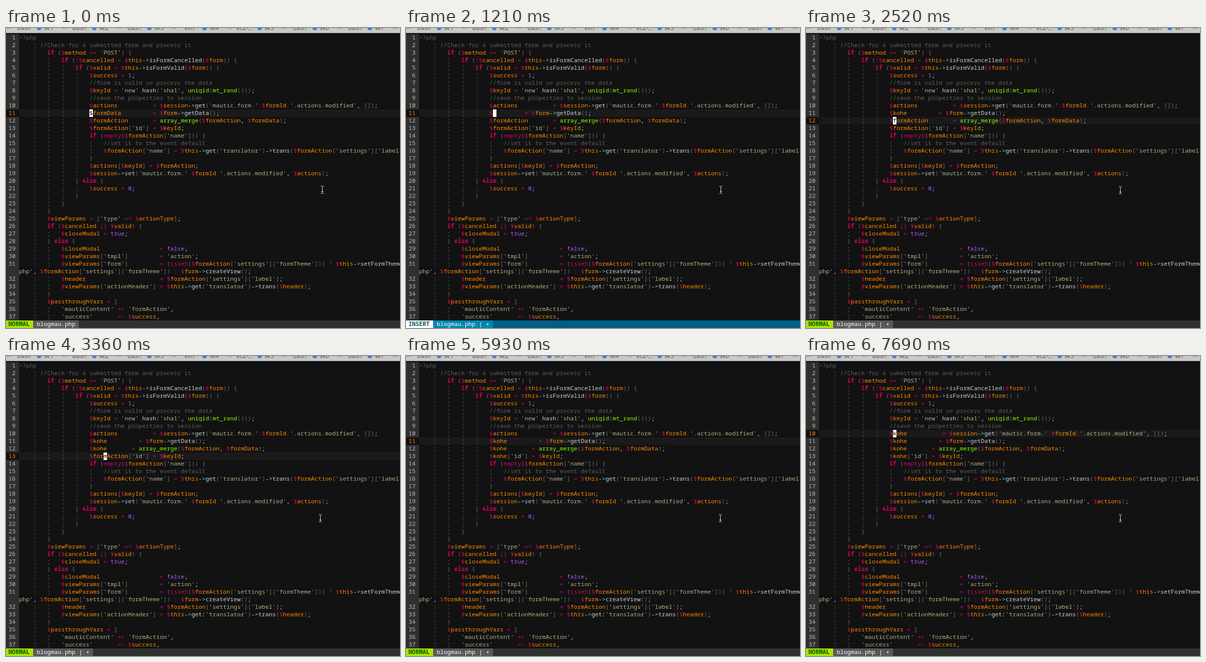
These frames come from a looping animation (784x597 px, 8 s). An HTML page with a canvas:

```html
<!DOCTYPE html>
<html lang="en">
<head>
<meta charset="utf-8">
<title>Editor session</title>
<style>
  html, body { margin: 0; width: 784px; height: 597px; overflow: hidden; background: #121212; }
  canvas { display: block; }
</style>
</head>
<body>
<canvas width="784" height="597"></canvas>
<script>
const ctx = document.querySelector('canvas').getContext('2d');
const W = 784, H = 597, CELL = 7, LINE = 15, LEFT = 26, TOP = 12, LOOP = 8000;
const FONT = '11.667px "Noto Sans Mono", monospace';
const BACK = '#121212', PLAIN = '#d0d0d0', GUIDE = '#585858';

const STYLES = {
  comment: '#5f5f5f', string: '#afaf87', variable: '#ff8700', arrow: '#5fd7ff',
  keyword: '#d7005f', operator: '#d7005f', constant: '#af5fff',
  call: '#87ff00', bracket: '#6c6c6c', plain: PLAIN
};
const TOKENS = new RegExp([
  String.raw`(?<comment>//.*|^<\?php)`,
  String.raw`(?<string>^php'|'[^']*')`,
  String.raw`(?<variable>(?<=\$)\w+)`,
  String.raw`(?<arrow>->)`,
  String.raw`(?<keyword>\b(?:if|else)\b)`,
  String.raw`(?<operator>[$=!.?:|<>]+|\b(?:empty|isset)\b)`,
  String.raw`(?<constant>\b(?:\d+|true|false)\b)`,
  String.raw`(?<call>\b(?:uniqid|mt_rand|array_merge)\b)`,
  String.raw`(?<bracket>[()[\]{}]+)`,
  String.raw`(?<plain>\w+|[,;]+)`
].join('|'), 'g');

// {n} marks the variable name being edited on line n.
const SOURCE = String.raw`<?php
      //Check for a submitted form and process it
        if ($method == 'POST') {
            if (!$cancelled = $this->isFormCancelled($form)) {
                if ($valid = $this->isFormValid($form)) {
                    $success = 1;
                    //form is valid so process the data
                    $keyId = 'new'.hash('sha1', uniqid(mt_rand()));
                    //save the properties to session
                    ${'$'}{10}          = $session->get('mautic.form.'.$formId.'.actions.modified', []);
                    ${'$'}{11}         = $form->getData();
                    ${'$'}{12}       = array_merge($formAction, $formData);
                    ${'$'}{13}['id'] = $keyId;
                    if (empty($formAction['name'])) {
                        //set it to the event default
                        $formAction['name'] = $this->get('translator')->trans($formAction['settings']['label']);
                    }
                    $actions[$keyId] = $formAction;
                    $session->set('mautic.form.'.$formId.'.actions.modified', $actions);
                } else {
                    $success = 0;
                }
            }
        }
        $viewParams = ['type' => $actionType];
        if ($cancelled || $valid) {
            $closeModal = true;
        } else {
            $closeModal                 = false;
            $viewParams['tmpl']         = 'action';
            $viewParams['form']         = (isset($formAction['settings']['formTheme'])) ? $this->setFormTheme
php', $formAction['settings']['formTheme']) : $form->createView();
            $header                     = $formAction['settings']['label'];
            $viewParams['actionHeader'] = $this->get('translator')->trans($header);
        }
        $passthroughVars = [
            'mauticContent' => 'formAction',
            'success'       => $success,`.split('\n');
const WRAPPED = 31;

const START = {
  row: 11, col: 20, shown: true, mode: 'NORMAL', changed: false, mouse: [629, 322],
  10: 'actions', 11: 'formData', 12: 'formAction', 13: 'formAction'
};
const hide = { shown: false };
const at = (row, col, more) => ({ row, col, shown: true, ...more });
const STEPS = [
  [170, at(11, 21)],
  [390, { 11: '' }],
  [440, { mode: 'INSERT' }],
  [500, { changed: true }],
  [1210, { mouse: [626, 322] }],
  [1300, at(11, 22, { 11: 'k' })],
  [1360, at(11, 24, { 11: 'koh' })],
  [1420, at(11, 25, { 11: 'kohe' })],
  [1720, at(11, 24)],
  [2010, { mode: 'NORMAL' }],
  [2070, at(12, 24)],
  [2400, at(12, 23, { mouse: [625, 323] })],
  [2460, at(12, 22)],
  [2520, at(12, 21)],
  [3060, at(12, 24, { 12: 'kohe' })],
  [3360, at(13, 24)],
  [4260, at(13, 21)],
  [4560, hide], [4620, at(13, 24, { 13: 'kohe' })],
  [5450, at(12, 24)],
  [5690, hide], [5750, at(11, 24)],
  [5930, hide], [6040, at(10, 24)],
  [6280, hide], [6330, at(10, 21)],
  [6510, hide], [6560, at(10, 24, { 10: 'kohe' })],
  [6920, hide], [6970, at(11, 24)],
  [7270, hide], [7330, at(10, 24)],
  [7630, hide], [7690, at(10, 21)]
];

const stateAt = time =>
  Object.assign({}, START, ...STEPS.filter(([start]) => start <= time).map(([, change]) => change));

function rect(x, y, w, h, color) {
  ctx.fillStyle = color;
  ctx.fillRect(x, y, w, h);
}

function text(string, x, y, color, bold = false, font = FONT) {
  ctx.font = (bold ? 'bold ' : '') + font;
  ctx.fillStyle = color;
  ctx.fillText(string, x, y);
}

function drawTabs() {
  const font = '12px "Noto Sans", "DejaVu Sans", sans-serif';
  rect(0, 0, W, 10, '#c9c9c9');
  ctx.textAlign = 'center';
  ['bash', 'bash', 'bash', 'vim', 'ec2-…', 'bash', 'bash', ''].forEach((name, i) => {
    const x = i * 109.7;
    text('×', x + 6, 4, '#666', false, '15px "Noto Sans", sans-serif');
    if (!name) return;
    text(name, x + 36, 4, '#555', false, font);
    text('⌘' + (i + 1), x + 85, 4, '#555', false, font);
    ctx.fillStyle = '#3c78e0';
    ctx.beginPath();
    ctx.arc(x + 66, 0, 4.5, 0, 7);
    ctx.fill();
  });
  ctx.textAlign = 'left';
}

function drawCode(line, y) {
  const indent = line.search(/\S/);
  for (let col = 4; col < indent; col += 4) text('¦', LEFT + col * CELL, y, GUIDE);
  for (const match of line.matchAll(TOKENS)) {
    const kind = Object.keys(match.groups).find(key => match.groups[key]);
    text(match[0], LEFT + match.index * CELL, y, STYLES[kind], kind === 'keyword');
  }
}

function drawEditor(state) {
  rect(0, TOP, LEFT, SOURCE.length * LINE, '#303030');
  SOURCE.forEach((template, i) => {
    const y = TOP + i * LINE, baseline = y + 11;
    const number = i < WRAPPED ? i + 1 : i === WRAPPED ? '' : i;
    const current = number === state.row;
    const line = template.replace(/\$\{(\d+)\}|\{(\d+)\}/g, (_, a, b) => (a ? '$' : '') + state[a || b]);
    if (current) {
      rect(0, y, LEFT, LINE, BACK);
      rect(LEFT, y, W, LINE, '#1a1a1a');
    }
    text(String(number).padStart(2), 5, baseline, current ? '#ff8700' : '#bcbcbc');
    drawCode(line, baseline);
    if (current && state.shown) {
      const x = LEFT + state.col * CELL;
      rect(x, y, CELL, LINE, '#fff');
      text(line[state.col] || ' ', x, baseline, BACK);
    }
  });
}

function drawStatus({ mode, changed }) {
  const y = H - LINE, insert = mode === 'INSERT';
  const label = 'blogmau.php' + (changed ? ' | +' : '');
  rect(0, y, W, LINE, insert ? '#005f87' : '#303030');
  rect(54, y, (label.length + 2) * CELL, LINE, insert ? '#0087af' : '#585858');
  rect(0, y, 54, LINE, insert ? '#fff' : '#afdf00');
  text(mode, 5, y + 11, insert ? '#005f5f' : '#005f00', true);
  text(label, 61, y + 11, '#fff');
}

function drawMouse([x, y]) {
  ctx.strokeStyle = '#e8e8e8';
  ctx.lineWidth = 1;
  ctx.beginPath();
  for (const dir of [-1, 1]) {
    ctx.moveTo(x - 2.5, y + dir * 7.5);
    ctx.lineTo(x - 1, y + dir * 7.5);
    ctx.lineTo(x + 0.5, y + dir * 6);
    ctx.lineTo(x + 2, y + dir * 7.5);
    ctx.lineTo(x + 3.5, y + dir * 7.5);
  }
  ctx.moveTo(x + 0.5, y - 6);
  ctx.lineTo(x + 0.5, y + 6);
  ctx.moveTo(x - 1.5, y + 3.5);
  ctx.lineTo(x + 2.5, y + 3.5);
  ctx.stroke();
}

function draw(now) {
  const state = stateAt(now % LOOP);
  rect(0, 0, W, H, BACK);
  drawTabs();
  drawEditor(state);
  drawStatus(state);
  drawMouse(state.mouse);
  requestAnimationFrame(draw);
}
requestAnimationFrame(draw);
</script>
</body>
</html>
```
